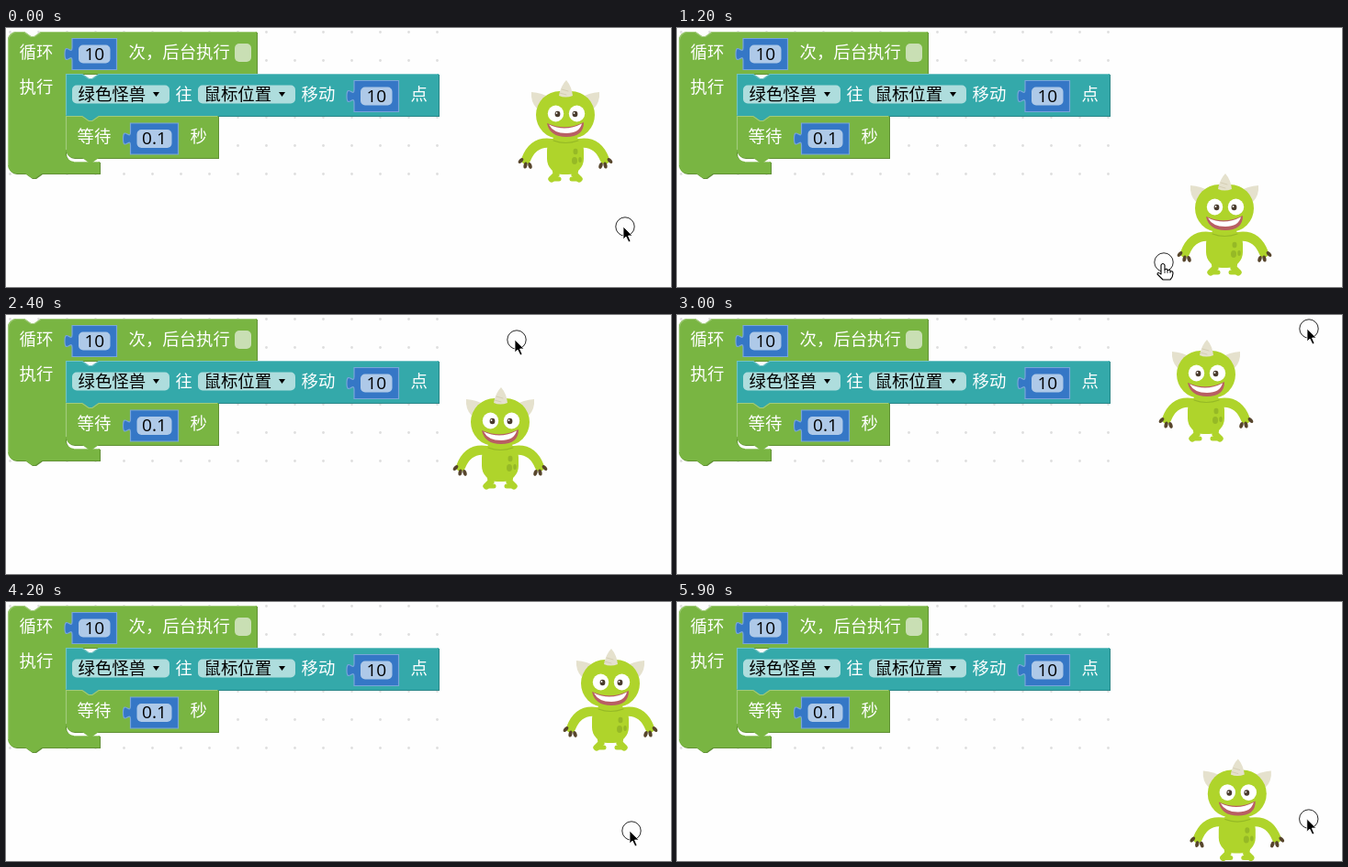
An HTML page with a canvas that plays this animation: 724x283 px, repeating every 6000 ms.

```html
<!DOCTYPE html>
<html lang="zh-CN">
<head>
<meta charset="utf-8">
<style>
html, body { margin: 0; width: 100%; height: 100%; overflow: hidden; background: #fefefe; }
canvas { display: block; }
</style>
</head>
<body>
<canvas id="stage" width="724" height="283"></canvas>
<script>
const ctx = document.getElementById('stage').getContext('2d');
const LOOP = 6000, STEP = 100, SPAN = 600;
const GREEN = '#79b542', TEAL = '#34a9aa', BLUE = '#3577c6';
const SKIN = '#afd42b', SHADE = '#96b926', HORN = '#e5e1cd', RIDGE = '#d5ceb4';
const CLAW = '#57452c', LIP = '#b85f63';

// Evenly timed key points, joined by a smooth curve.
const monsterPath = [[608, 57], [632, 117], [595, 159], [552, 138], [537, 79], [575, 27],
  [628, -1], [657, 51], [661, 105], [592, 136], [612, 176]];
const mousePath = [[674, 217], [628, 262], [530, 256], [506, 110], [556, 27], [688, 15],
  [688, 39], [681, 250], [560, 244], [515, 258], [712, 234]];

function glide(path, t) {
  const i = Math.floor(t / SPAN), u = t / SPAN - i;
  const at = k => path[Math.min(Math.max(i + k, 0), path.length - 1)];
  return [0, 1].map(axis => {
    const [a, b, c, d] = [-1, 0, 1, 2].map(k => at(k)[axis]);
    return b + u / 2 * (c - a + u * (2 * a - 5 * b + 4 * c - d + u * (3 * (b - c) + d - a)));
  });
}

function shape(d, fill, stroke, width = 1) {
  const p = new Path2D(d);
  if (fill) { ctx.fillStyle = fill; ctx.fill(p); }
  if (stroke) { ctx.strokeStyle = stroke; ctx.lineWidth = width; ctx.stroke(p); }
}

function oval(x, y, rx, ry, fill, turn = 0) {
  ctx.beginPath();
  ctx.ellipse(x, y, rx, ry, turn, 0, 7);
  ctx.fillStyle = fill;
  ctx.fill();
}

function box(x, y, w, h, fill, r = 5) {
  ctx.beginPath();
  ctx.roundRect(x, y, w, h, r);
  ctx.fillStyle = fill;
  ctx.fill();
}

function placed(x, y, draw, sx = 1, sy = 1) {
  ctx.save();
  ctx.translate(x, y);
  ctx.scale(sx, sy);
  draw();
  ctx.restore();
}

function label(text, x, cy, color = '#fff') {
  ctx.font = '18.4px "Noto Sans CJK SC", "Noto Sans CJK", sans-serif';
  ctx.textAlign = 'left';
  ctx.fillStyle = color;
  ctx.fillText(text, x + 0.5, cy + 6.2);
}

function block(d, fill, dark, light, edge) {
  shape(d, dark);
  placed(-1, -1, () => {
    shape(d, fill);
    shape(edge, null, light, 1.2);
  });
}

function numberBlock(x, y, w, text) {
  shape(`M${x} ${y}h${w}v34h${-w}v-10c0 -9 -8 7 -8 -7s8 2 8 -7z`, BLUE, '#78a5da', 1.2);
  box(x + 7, y + 7, w - 14, 20, '#aec9e8');
  ctx.font = '19px "Open Sans", "Noto Sans", sans-serif';
  ctx.textAlign = 'center';
  ctx.fillStyle = '#000';
  ctx.fillText(text, x + w / 2, y + 23);
}

function dropdown(x, text) {
  box(x, 62.5, 106, 20, '#aedddd');
  label(text, x + 6, 73, '#000');
  shape(`M${x + 88} 70h7l-3.5 5z`, '#000');
}

function drawProgram() {
  for (let x = 4.5; x < 473; x += 31)
    for (let y = 4.5; y < 162; y += 31) oval(x, y, 1.4, 1.4, '#dedede');

  const notch = 'l7 5h4l7 -5', back = 'l-7 5h-4l-7 -5';
  block(`M3 14a9 9 0 0 1 9 -9h9${notch}H274V51H66V138a9 9 0 0 0 9 9H103V160H40${back}H12a9 9 0 0 1 -9 -9z`,
    GREEN, '#619135', '#a1cb7b', `M3.5 151V14a9 9 0 0 1 9 -8.5h8.5${notch}H273M75 147.5h27`);
  block(`M66 51H84${notch}H472V97H102${back}H66z`, TEAL, '#2a8788', '#71c3c4',
    `M66.5 96.5V51.5H84${notch}H471`);
  block(`M66 97H84${notch}H232V143H75a9 9 0 0 1 -9 -9z`, GREEN, '#619135', '#a1cb7b',
    `M66.5 134V97.5H84${notch}H231`);
  shape(`M101 142${back}z`, GREEN);

  label('循环', 14, 27);
  label('次，后台执行', 133, 27);
  label('执行', 14, 65);
  label('往', 184, 73);
  label('移动', 321, 73);
  label('点', 440, 73);
  label('等待', 77, 119);
  label('秒', 200, 119);
  box(249, 17, 18, 20, '#c9dfb4');
  dropdown(72, '绿色怪兽');
  dropdown(209, '鼠标位置');
  numberBlock(72, 11.5, 48.5, '10');
  numberBlock(379, 57.5, 48.5, '10');
  numberBlock(135.5, 104, 52, '0.1');
}

function drawSide() {
  ctx.lineCap = 'round';
  shape('M15 69Q35 66 43 87', null, SKIN, 10);
  for (let k = 0; k < 3; k++) oval(48.5 - 5 * k, 88 + 6 * Math.sin(k), 2, 3.5, CLAW, 0.5 * k - 0.7);
  shape('M11 96L10 103L15 108', null, SKIN, 7);
  shape('M7 108H16', null, SKIN, 5);
  shape('M31 31Q38 24 37 13Q25 14 17 19z', HORN);
}

function drawMonster() {
  drawSide();
  placed(0, 0, drawSide, -1);
  box(-20, 60, 40, 43, SKIN, 17);
  oval(11, 78, 2.5, 3.2, SHADE);
  oval(10, 88, 3, 4, SHADE);
  oval(16, 87, 1.8, 3, SHADE);
  shape('M-13 66Q0 71 14 66', null, SHADE, 1.2);
  box(-32, 12, 64, 52, SKIN, 26);
  shape('M-7 17Q-5 6 1 0Q7 7 8 17Q0 20 -7 17z', HORN);
  shape('M-4 10l7 2M-6 14l7 2', null, RIDGE);
  for (const side of [-1, 1]) {
    const x = 1 + 11.5 * side;
    oval(x, 36.5, 8.7, 8.9, '#fff');
    oval(x - 2 * side, 37, 2.9, 3.3, '#493b2d');
    oval(x - 2 * side - 1, 36, 0.9, 0.9, '#fff');
  }
  shape('M-20 47Q0 56 20 46Q20 62 1 62Q-17 62 -20 47z', LIP);
  shape('M-18 48.5Q0 57 18 47.5Q15 58 1 58Q-13 58 -18 48.5z', '#fff');
}

function drawPointer(hand) {
  ctx.beginPath();
  ctx.arc(0, 0, 10.2, 0, 7);
  ctx.strokeStyle = '#111';
  ctx.lineWidth = 0.9;
  ctx.stroke();
  ctx.lineJoin = 'round';
  if (hand) {
    shape('M-3 13V3Q-1 0 1 3V8Q4 6 4 9Q7 7 7 10Q10 9 10 12Q10 16 7 19H-1L-7 13Q-7 10 -3 13z',
      '#fff', '#000', 1.1);
    shape('M1 8v4M4 9v3M7 10v2', null, '#000', 0.8);
  } else {
    shape('M-2 0V14L1 11L4 17L6 16L3.5 10H8z', '#000', '#fff', 0.8);
  }
}

function frame() {
  const t = Math.floor((performance.now() % LOOP) / STEP) * STEP;
  const [monsterX, monsterY] = glide(monsterPath, t);
  ctx.fillStyle = '#fefefe';
  ctx.fillRect(0, 0, 724, 283);
  drawProgram();
  placed(monsterX + 1, monsterY, drawMonster);
  placed(...glide(mousePath, t), () => drawPointer(t >= 1100 && t <= 1300));
  requestAnimationFrame(frame);
}
frame();
</script>
</body>
</html>
```
